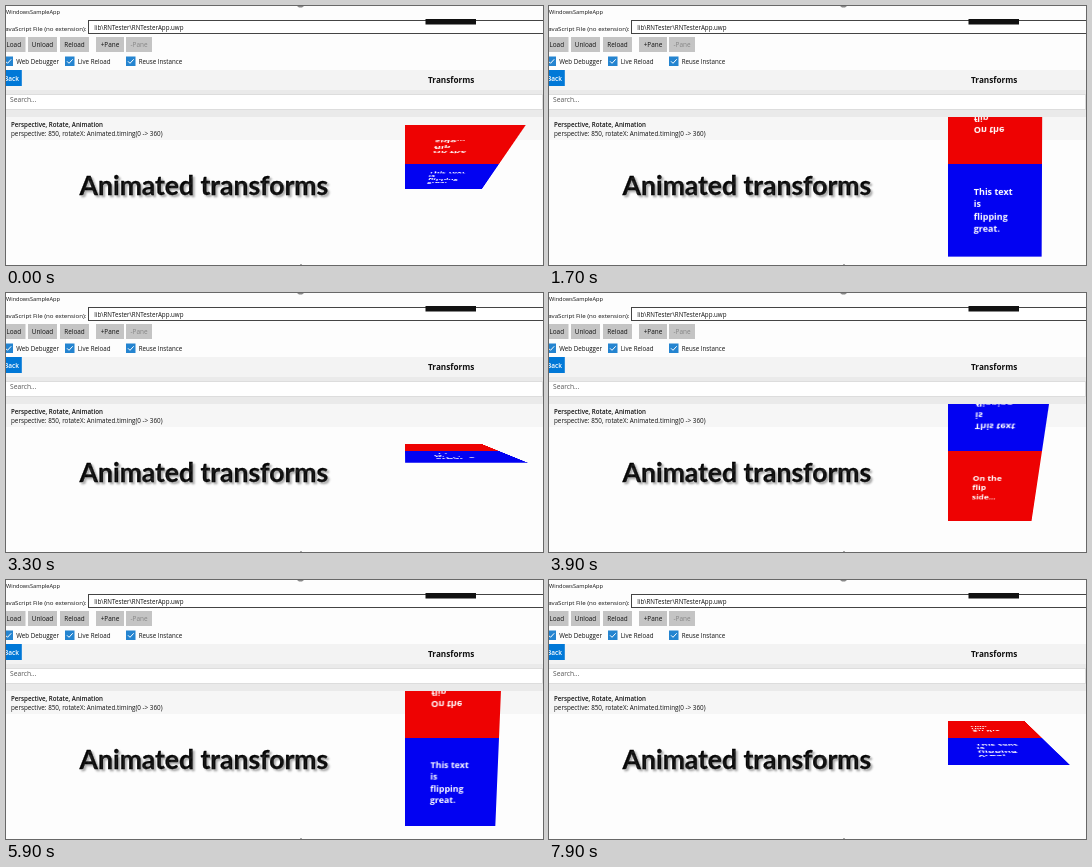
Animation of 537 by 259 pixels, one loop 8 s. Source, as an HTML page:

```html
<!DOCTYPE html>
<html>
<head>
<meta charset="utf-8">
<style>
html, body { margin: 0; width: 100%; height: 100%; overflow: hidden; background: #fdfdfd; }
svg, #clip { position: absolute; left: 0; top: 0; }
svg { font-family: "Open Sans", "Noto Sans", sans-serif; fill: #111; }
#clip { left: 398.5px; top: 111px; width: 138.5px; height: 148px; overflow: hidden; }
.card {
  position: absolute; left: 0; top: 46.5px; width: 93.5px; height: 93px;
  display: flex; align-items: center; justify-content: center;
  transform-origin: 0 0; color: #fff; outline: 1px solid transparent;
  font: 700 9px/12.2px "Open Sans", "Noto Sans", sans-serif;
}
.card p { margin: 0; width: 42px; white-space: nowrap; }
.title {
  font: 700 26.5px Lato, sans-serif; fill: #000; stroke: #000; stroke-width: .3px;
  text-shadow: 2px 2px 2px #aaa;
}
</style>
</head>
<body>
<svg id="ui" width="537" height="259"></svg>
<div id="clip">
  <div class="card" id="front" style="background:#0202f2"><p>This text<br>is<br>flipping<br>great.</p></div>
  <div class="card" id="back" style="background:#ee0202"><p>On the<br>flip<br>side...</p></div>
</div>
<script>
const ui = document.getElementById("ui");
const rect = (x, y, w, h, fill, stroke = "none") =>
  `<rect x="${x}" y="${y}" width="${w}" height="${h}" fill="${fill}" stroke="${stroke}"/>`;
const text = (x, y, size, str, attrs = "") =>
  `<text x="${x}" y="${y}" font-size="${size}" ${attrs}>${str}</text>`;
const button = (x, w, label, fill = "#111") =>
  rect(x, 31, w, 15, "#c4c4c4") + text(x + w / 2, 41, 6.4, label, `text-anchor="middle" fill="${fill}"`);
const check = (x, label) =>
  rect(x, 50.5, 9.5, 9.5, "#2484d0") +
  `<path d="M${x + 2} 55.3l2 2 3.7-4" fill="none" stroke="#fff"/>` + text(x + 12.7, 57.5, 6.2, label);

ui.innerHTML =
  text(0, 8, 5.65, "WindowsSampleApp") +
  '<path d="M291 0h7l-2 1.5h-3z" fill="#888"/>' +
  text(-2.5, 24.5, 6.15, "JavaScript File (no extension):") +
  rect(82.5, 14.5, 460, 13, "#fff", "#444") +
  text(88.3, 23.5, 6.2, "lib\\RNTester\\RNTesterApp.uwp") +
  rect(419.5, 13, 50.5, 5.5, "#111") +
  button(-4, 23.5, "Load") + button(22, 29, "Unload") + button(54, 29, "Reload") +
  button(90, 28, "+Pane") + button(120, 26, "-Pane", "#858585") +
  check(-2.5, "Web Debugger") + check(59, "Live Reload") + check(120, "Reuse Instance") +
  rect(0, 64, 537, 20, "#f3f3f3") + rect(0, 84, 537, 27, "#eaeaea") +
  rect(0, 64, 15.8, 16, "#0078d7") + text(-2, 74.5, 6.5, "Back", 'fill="#fff" font-weight="600"') +
  text(422, 77, 8.2, "Transforms", 'font-weight="700"') +
  rect(-1, 88.5, 537.5, 15, "#fff", "#ddd") + text(4, 95.5, 6.7, "Search...", 'fill="#555"') +
  rect(0, 111, 537, 23, "#f6f6f6") +
  text(5, 121, 6.2, "Perspective, Rotate, Animation", 'font-weight="600"') +
  text(5, 130, 6.3, "perspective: 850, rotateX: Animated.timing(0 -&gt; 360)") +
  text(73.6, 189, 26, "Animated transforms", 'class="title"') +
  rect(294, 258, 2, 1, "#aaa");

// Time in ms against turns of the card, before easing
const keys = [[0, .715], [450, .72], [800, .779], [2700, 1.189], [3900, 1.444],
  [4700, 1.631], [5900, 1.906], [7900, 2.2995]];

function turnsAt(t) {
  const i = Math.max(1, keys.findIndex(k => k[0] >= t));
  const [t0, a] = keys[i - 1], [t1, b] = keys[i];
  return a + (b - a) * (t - t0) / (t1 - t0);
}

// cubic-bezier(.42, 0, 1, 1)
function easeIn(x) {
  let lo = 0, hi = 1;
  for (let i = 0; i < 24; i++) {
    const p = (lo + hi) / 2, q = 1 - p;
    if (1.26 * p * q * q + 3 * p * p * q + p ** 3 < x) lo = p; else hi = p;
  }
  return lo * lo * (3 - 2 * lo);
}
const easeInOut = u => u < .5 ? easeIn(2 * u) / 2 : 1 - easeIn(2 - 2 * u) / 2;

const flip = (id, deg) =>
  document.getElementById(id).style.transform = `perspective(395px) rotateX(${deg}deg)`;

function draw(now) {
  const t = Math.floor(now % 8000 / 100) * 100;
  const deg = 360 * easeInOut(turnsAt(t) % 1);
  flip("front", deg);
  flip("back", deg + 180);
  requestAnimationFrame(draw);
}
draw(performance.now());
</script>
</body>
</html>
```
